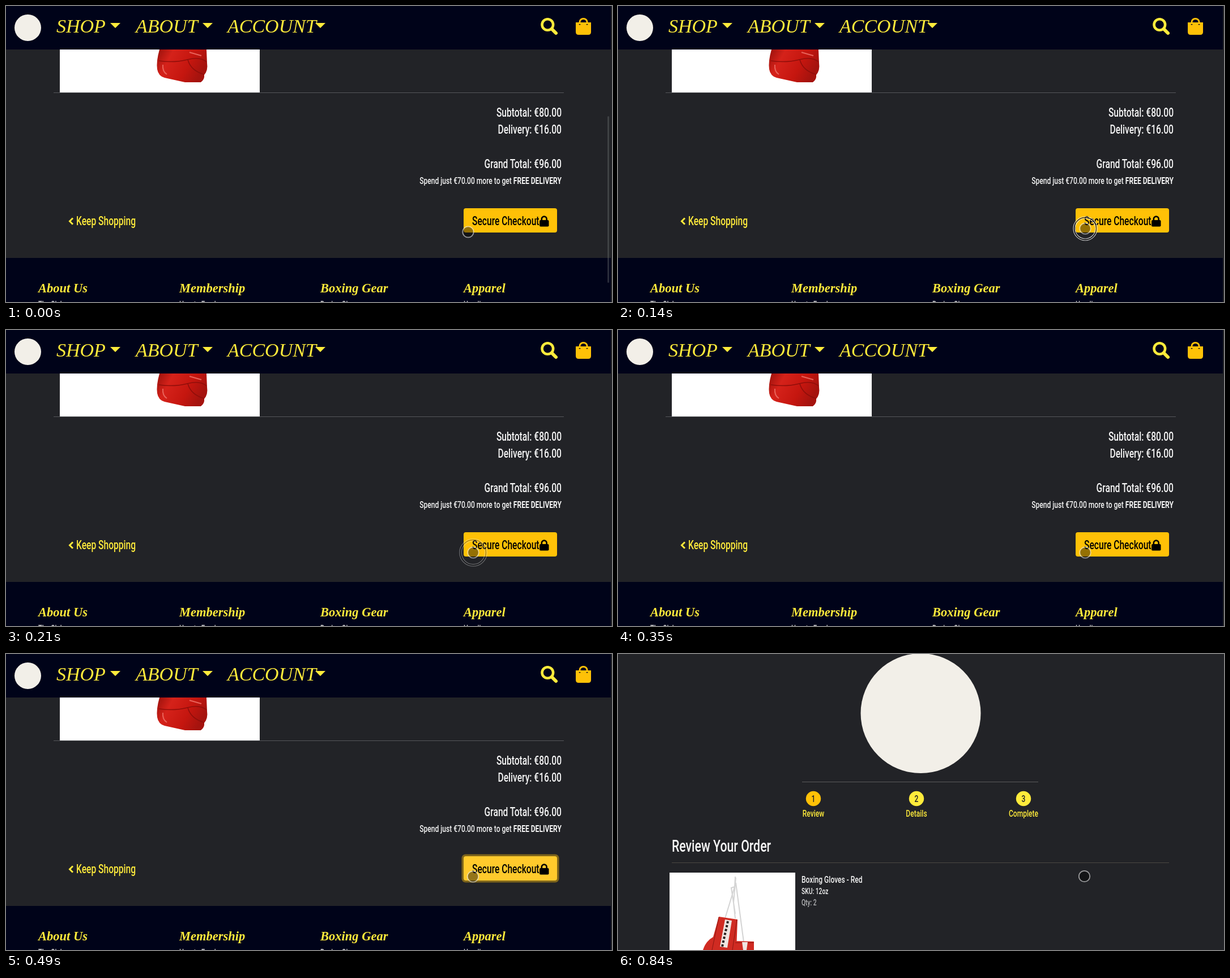
Recreate the animation shown at these times as an HTML page. Size 1070x524 px, loop 0.91 s.

```html
<!DOCTYPE html>
<html lang="en">
<head>
<meta charset="utf-8">
<title>Checkout</title>
<style>
  html, body { margin: 0; width: 100%; height: 100%; overflow: hidden; background: #222327; }
  svg { display: block; width: 1070px; height: 524px; }
  .plain { font-family: Roboto, "Liberation Sans", sans-serif; font-weight: 500; }
  .script { font-family: "Liberation Serif", serif; font-style: italic; fill: #ffeb3b; }
  .bold { font-weight: 700; }
</style>
</head>
<body>
<svg viewBox="0 0 1070 524">
  <defs>
    <linearGradient id="leather" x2="1" y2=".35">
      <stop stop-color="#98100b"/><stop offset=".3" stop-color="#d5221a"/>
      <stop offset=".7" stop-color="#c5160f"/><stop offset="1" stop-color="#a5130e"/>
    </linearGradient>
  </defs>

  <g id="bag">
    <path fill="#fff" d="M95 77H448V153H95Z"/>
    <path fill="url(#leather)" d="M271 77Q265 98 267 112Q269 124 280 127L316 135H344Q351 130 350 122Q357 114 355 101L354 77Z"/>
    <path fill="none" stroke="#8f0e0a" stroke-width="1.5" d="M270 97Q297 101 320 95T354 99M321 95Q326 114 349 121"/>
    <path fill="none" stroke="#e8635a" stroke-width="2" d="M277 104Q276 116 284 121M324 82L345 88"/>
    <path stroke="#55565a" d="M84 153.5H985"/>
    <path fill="#000319" d="M0 0H1068V77H0ZM0 446H1068V524H0Z"/>
    <circle cx="38.5" cy="38.5" r="23.5" fill="#f2efe8"/>
    <path fill="#ffeb3b" d="M184 30h18l-9 9zM347 30h18l-9 9zM546 30h18l-9 9z"/>
    <g fill="none" stroke="#ffeb3b">
      <circle cx="956.3" cy="33" r="9.8" stroke-width="4.6"/>
      <path stroke-width="6" stroke-linecap="round" d="M964 41l7 7"/>
      <path stroke-width="3" d="M118 375.500l-5.500 5.500 5.500 5.500"/>
    </g>
    <path fill="#ffc107" d="M1006 29h27v17q0 5-5 5h-17q-5 0-5-5z"/>
    <path fill="none" stroke="#ffc107" stroke-width="3" d="M1013 31v-3a6.500 5.500 0 0 1 13 0v3"/>
    <path fill="#000319" d="M1011.500 32a1.500 1.500 0 0 0 3 0zM1024.500 32a1.500 1.500 0 0 0 3 0z"/>
    <rect id="focus" x="804.500" y="354.500" width="172" height="50" rx="7" fill="#7e651b"/>
    <rect id="button" x="808" y="358" width="165" height="43" rx="4"/>
    <rect x="942" y="379" width="16.500" height="11.500" rx="2"/>
    <path fill="none" stroke="#000" stroke-width="2.600" d="M945.800 380v-3a4.400 4.400 0 0 1 8.800 0v3"/>
    <rect id="scrollbar" x="1062" y="195" width="3" height="295" rx="1.500" fill="#77787c"/>
  </g>

  <g id="review">
    <circle cx="534.5" cy="105" r="106" fill="#f2efe8"/>
    <path stroke="#5b5b5c" d="M325 226.500H742"/>
    <path stroke="#4b4842" d="M95 369.500H973"/>
    <path fill="#fff" d="M91 387H313V524H91Z"/>
    <path fill="none" stroke="#d4d4d4" stroke-width="2" d="M207 394L206 412L189 468M208 396L204 440L207 468M208 405L222 510M206 412L200 414L207 460"/>
    <path fill="#d02b22" d="M178 465L211 470L209 524H150Q155 508 168 501ZM206 508L240 509V524H206Z"/>
    <path fill="none" stroke="#8c1711" d="M178 466L171 500L166 524M210 470L202 524M207 511H240"/>
    <path fill="#efe5e1" d="M189 470L201 472L193 520L180 518Z"/>
    <path fill="none" stroke="#29201f" stroke-width="4" stroke-dasharray="4 3" d="M194 473L184 518"/>
    <path fill="#efe5e1" d="M219 510h10l-2 14h-6z"/>
  </g>

  <g id="cursor">
    <circle r="9.700" fill="#000" fill-opacity=".42" stroke="#fff" stroke-opacity=".55" stroke-width="1.800"/>
    <g id="ripple" fill="none">
      <circle r="19.500" stroke="#000" stroke-opacity=".6" stroke-width="2.500"/>
      <circle r="18" stroke="#fff" stroke-opacity=".75" stroke-width="1.200"/>
      <circle r="21" stroke="#fff" stroke-opacity=".75" stroke-width="1.200"/>
    </g>
  </g>
</svg>
<script>
const $ = id => document.getElementById(id);
const bag = $('bag'), review = $('review');
const CONDENSED = 0.71;

function add(page, tag, attrs, content = '') {
  const el = document.createElementNS('http://www.w3.org/2000/svg', tag);
  for (const name in attrs) el.setAttribute(name, attrs[name]);
  el.innerHTML = content;
  page.append(el);
}

function plain(page, x, y, size, content, fill = '#f5f5f5', anchor = 'start') {
  add(page, 'text', {
    class: 'plain', 'font-size': size, fill, 'text-anchor': anchor,
    transform: `translate(${x} ${y}) scale(${CONDENSED} 1)`
  }, content);
}

function script(x, y, size, content, style = '') {
  add(bag, 'text', { class: 'script ' + style, x, y, 'font-size': size }, content);
}

[[89, 'SHOP'], [229, 'ABOUT'], [391, 'ACCOUNT']].forEach(([x, name]) => script(x, 47, 34, name));

[[57, 'About Us', 'The Club'], [306, 'Membership', 'How to Enrol'],
 [555, 'Boxing Gear', 'Boxing Gloves'], [808, 'Apparel', 'Hoodies']].forEach(([x, title, link]) => {
  script(x, 507, 22.5, title, 'bold');
  plain(bag, x, 534, 16, link, '#c8c8c8');
});

[[196, 'Subtotal: €80.00'], [226, 'Delivery: €16.00'], [287, 'Grand Total: €96.00']]
  .forEach(([y, sum]) => plain(bag, 981, y, 22, sum, '#f5f5f5', 'end'));
plain(bag, 981, 315, 17, 'Spend just €70.00 more to get <tspan class="bold">FREE DELIVERY</tspan>', '#f5f5f5', 'end');
plain(bag, 124, 387.5, 22, 'Keep Shopping', '#ffeb3b');
plain(bag, 823, 387.5, 22, 'Secure Checkout', '#000');

[[345, 'Review', '#ffc107'], [527, 'Details', '#ffeb3b'], [716, 'Complete', '#ffeb3b']].forEach(([x, name, fill], i) => {
  add(review, 'circle', { cx: x, cy: 256, r: 13.2, fill });
  plain(review, x, 261.5, 17, i + 1, '#222327', 'middle');
  plain(review, x, 288, 17, name, '#ffeb3b', 'middle');
});
plain(review, 95, 350, 30, 'Review Your Order');
plain(review, 324, 405, 17, 'Boxing Gloves - Red');
plain(review, 324, 425, 14.5, 'SKU: 12oz');
plain(review, 324, 445, 14.5, 'Qty: 2', '#b3b4b6');

const LOOP = 910, STEP = 70;

function draw(now) {
  const step = Math.floor(now % LOOP / STEP);
  const onReview = step >= 8, focused = step === 7;
  bag.style.display = onReview ? 'none' : '';
  review.style.display = onReview ? '' : 'none';

  // The pointer eases onto the button, clicks, then drifts slightly.
  const glide = 1 - (1 - Math.min(step / 2, 1)) ** 2;
  const x = onReview ? 823.5 : focused ? 824.5 : 816 + 9 * glide;
  const y = onReview ? 393.5 : 400 - 6 * glide;
  $('cursor').setAttribute('transform', `translate(${x} ${y})`);
  $('ripple').setAttribute('opacity', step === 2 ? 1 : step === 3 ? 0.4 : 0);
  $('ripple').setAttribute('transform', `scale(${step === 3 ? 1.15 : 1})`);

  $('scrollbar').setAttribute('opacity', 0.35 * Math.max(0, 1 - step / 2));
  $('focus').setAttribute('opacity', focused ? 1 : 0);
  $('button').setAttribute('fill', focused ? '#ffca2c' : '#ffc107');
  requestAnimationFrame(() => draw(performance.now() - start));
}

const start = performance.now();
draw(0);
</script>
</body>
</html>
```
